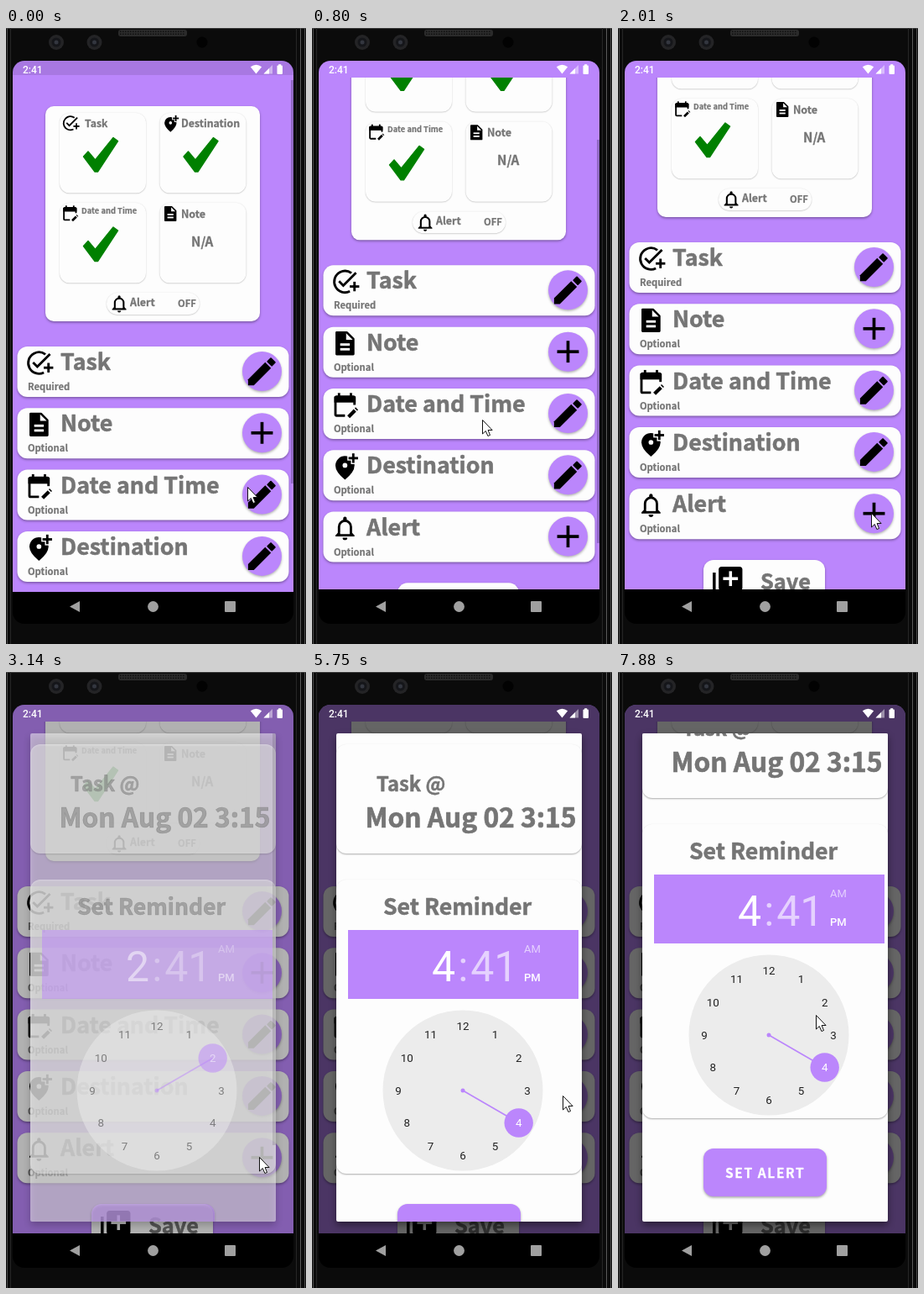
Write an HTML page with a canvas that moves like this. It is 358 px wide and 733 px high and loops after 8 s.

```html
<!DOCTYPE html>
<html lang="en">
<head>
<meta charset="utf-8">
<title>Reminder app</title>
<style>
html, body { margin: 0; width: 100%; height: 100%; overflow: hidden; background: #0b0b0b; }
canvas { display: block; width: 358px; height: 733px; }
</style>
</head>
<body>
<canvas id="stage"></canvas>
<script>
const W = 358, H = 733, LOOP = 8000, TICK = 120;
const canvas = document.getElementById('stage');
const ctx = canvas.getContext('2d');
const dpr = window.devicePixelRatio || 1;
canvas.width = W * dpr;
canvas.height = H * dpr;

const HEAD = '"Noto Sans CJK JP", "Noto Sans CJK SC", "Noto Sans", sans-serif';
const UI = 'Roboto, sans-serif';
const PURPLE = '#bb86fc', PAPER = '#fdfdfd', GREY = '#757575', FAINT = 'rgba(255,255,255,.62)';

// motion
const ramp = (t, from, to) => Math.min(1, Math.max(0, (t - from) / (to - from)));
const easeOut = (p, power) => 1 - (1 - p) ** power;
const smooth = p => p * p * (3 - 2 * p);

const settle = t => 3 * (1 - ramp(t, 0, 390));
const pageScroll = t => 121 * easeOut(ramp(t, 530, 1400), 4);
const pageBar = t => 1 - ramp(t, 1520, 2000);
const sheetScroll = t => 66 * easeOut(ramp(t, 5750, 6250), 2);
const sheetBar = t => 1 - (t < 5750 ? ramp(t, 4280, 4640) : ramp(t, 6740, 6980));

// pointer stops: time of arrival, x, y
const STOPS = [
  [0, 289, 547], [390, 215, 575], [800, 204, 467], [1450, 335, 573], [2000, 303, 578],
  [3650, 303, 578], [4040, 288, 512], [4700, 266, 464], [5000, 267, 477], [5360, 302, 540],
  [5720, 300, 505], [6100, 250, 474], [6490, 206, 602], [6980, 206, 602], [7880, 237, 409]];

function pointerAt(t) {
  const i = STOPS.findLastIndex(s => s[0] <= t);
  const a = STOPS[i], b = STOPS[i + 1] || a;
  const p = a === b ? 0 : smooth(ramp(t, a[0], b[0]));
  return [a[1] + (b[1] - a[1]) * p, a[2] + (b[2] - a[2]) * p];
}

// drawing helpers
function rect(x, y, w, h, color) {
  ctx.fillStyle = color;
  ctx.fillRect(x, y, w, h);
}

function round(x, y, w, h, r, color) {
  ctx.fillStyle = color;
  ctx.beginPath();
  ctx.roundRect(x, y, w, h, r);
  ctx.fill();
}

function disc(x, y, r, color) {
  ctx.fillStyle = color;
  ctx.beginPath();
  ctx.arc(x, y, r, 0, Math.PI * 2);
  ctx.fill();
}

function poly(points, color) {
  ctx.fillStyle = color;
  ctx.beginPath();
  points.forEach(p => ctx.lineTo(...p));
  ctx.closePath();
  ctx.fill();
}

function line(points, width, color = '#000') {
  ctx.strokeStyle = color;
  ctx.lineWidth = width;
  ctx.beginPath();
  points.forEach(p => ctx.lineTo(...p));
  ctx.stroke();
}

function outline(width, color, join = 'round') {
  ctx.strokeStyle = color;
  ctx.lineWidth = width;
  ctx.lineJoin = join;
  ctx.stroke();
}

function plus(x, y, arm, color = '#000') {
  rect(x - arm, y - 1, arm * 2, 2, color);
  rect(x - 1, y - arm, 2, arm * 2, color);
}

function raised(draw, strength = 0.35, blur = 3, dy = 1.5) {
  ctx.save();
  ctx.shadowColor = `rgba(0,0,0,${strength})`;
  ctx.shadowBlur = blur * dpr;
  ctx.shadowOffsetY = dy * dpr;
  draw();
  ctx.restore();
}

function clip(x, y, w, h, r = 0) {
  ctx.beginPath();
  ctx.roundRect(x, y, w, h, r);
  ctx.clip();
}

function text(str, x, y, size, { color = GREY, font = HEAD, weight = 700, align = 'left', gap = 0 } = {}) {
  ctx.font = `${weight} ${size}px ${font}`;
  ctx.fillStyle = color;
  ctx.textAlign = align;
  ctx.letterSpacing = gap + 'px';
  ctx.fillText(str, x, y);
  if (font === HEAD) {   // a little extra weight for headings
    ctx.strokeStyle = color;
    ctx.lineWidth = size * 0.022;
    ctx.lineJoin = 'round';
    ctx.strokeText(str, x, y);
  }
  ctx.letterSpacing = '0px';
}

// icons on a 24-unit grid
const ICONS = {
  task() {
    ctx.beginPath();
    ctx.arc(12, 12, 9, 1.1, 5.36);
    outline(2, '#000', 'miter');
    line([[7, 11.6], [10.6, 15.2], [21.3, 4.5]], 2);
    plus(20, 16, 4);
  },
  note() {
    poly([[5, 3], [13.6, 3], [19, 8.4], [19, 21], [5, 21]], '#000');
    outline(2, '#000');
    poly([[13, 3.5], [18.5, 9], [13, 9]], PAPER);
    for (const y of [12, 16]) rect(8, y, 8, 2, PAPER);
  },
  date() {
    ctx.beginPath();
    ctx.roundRect(4, 5, 16, 16, 1);
    outline(2, '#000');
    rect(3, 5, 18, 5, '#000');
    for (const x of [6, 16]) rect(x, 2, 2, 3, '#000');
    rect(12, 12, 11, 11, PAPER);
    line([[15, 22], [20.4, 16.6]], 3);
    line([[21.2, 15.8], [22, 15]], 3);
  },
  place() {
    ctx.fillStyle = '#000';
    ctx.beginPath();
    ctx.moveTo(12, 23);
    ctx.quadraticCurveTo(4, 16.5, 4, 11.2);
    ctx.arc(12, 11.2, 8, Math.PI, 0);
    ctx.quadraticCurveTo(20, 16.5, 12, 23);
    ctx.fill();
    rect(14, 1, 10, 6, PAPER);
    rect(17, 1, 7, 9, PAPER);
    disc(12, 11, 2, PAPER);
    plus(19, 5, 4);
  },
  bell() {
    ctx.beginPath();
    ctx.moveTo(7, 17);
    ctx.arc(12, 10.8, 5, Math.PI, 0);
    ctx.lineTo(17, 17);
    outline(2, '#000');
    round(10.5, 2.5, 3, 4, 1.5, '#000');
    poly([[6, 16], [18, 16], [20, 18], [20, 19], [4, 19], [4, 18]], '#000');
    rect(8, 15.5, 8, 1.5, PAPER);
    ctx.fillStyle = '#000';
    ctx.beginPath();
    ctx.arc(12, 20, 2, 0, Math.PI);
    ctx.fill();
  },
  save() {
    round(6, 2, 16, 16, 2, '#000');
    plus(14, 10, 5, PAPER);
    ctx.lineJoin = 'round';
    line([[3, 6], [3, 21], [18, 21]], 2);
  },
  edit() {
    poly([[3, 17.25], [14.05, 6.2], [17.8, 9.95], [6.75, 21], [3, 21]], '#000');
    poly([[15.7, 5.7], [17.7, 3.7], [20.3, 6.3], [18.3, 8.3]], '#000');
    outline(1, '#000');
  },
  add() { plus(12, 12, 7); }
};

function icon(name, x, y, scale) {
  ctx.save();
  ctx.translate(x, y);
  ctx.scale(scale, scale);
  ICONS[name]();
  ctx.restore();
}

function drawPhone() {
  rect(0, 0, W, H, '#0b0b0b');
  rect(0, 0, W, 1, '#3a3a3a');
  for (const x of [1, 356]) rect(x, 0, 1, H, '#4a4a4a');
  for (const x of [5, 346]) rect(x, 0, 1, H, '#262626');
  rect(351, 0, 1, H, '#5a5a5a');
  for (const x of [60, 105.5]) {
    disc(x, 17, 9, '#242426');
    disc(x, 17, 5.5, '#15161a');
    disc(x, 17, 2.5, '#33363f');
  }
  disc(234, 17, 6.5, '#020202');
  round(134, 2, 82, 8, 3, '#2b2b2b');
  for (let x = 136; x < 214; x += 3)
    for (let y = 3.5; y < 9; y += 3) rect(x, y, 1.5, 1.5, '#111');
  round(8, 39, 335, 670, 14, '#000');
}

function drawNav() {
  const c = '#a0a0a0';
  poly([[76, 688.5], [88, 682], [88, 695]], c);
  disc(175.5, 688.5, 6.4, c);
  round(261, 682, 13, 13, 1, c);
}

function drawStatus() {
  const c = '#fff';
  text('2:41', 20, 53.5, 12, { color: c, font: UI, weight: 500 });
  ctx.fillStyle = c;
  ctx.beginPath();
  ctx.moveTo(298.5, 54.5);
  ctx.lineTo(291.8, 46.3);
  ctx.quadraticCurveTo(298.5, 41, 305.2, 46.3);
  ctx.fill();
  poly([[318, 44], [318, 54.5], [307.5, 54.5]], 'rgba(255,255,255,.45)');
  poly([[314, 48], [314, 54.5], [307.5, 54.5]], c);
  round(323.5, 44.5, 6.5, 10.5, 1, c);
  rect(325.2, 43.2, 3, 2, c);
}

function drawCheck(x, y) {
  ctx.save();
  ctx.translate(x, y);
  poly([[0.5, 24], [6, 18], [14.5, 28], [36, 1.5], [41.5, 5.5], [17.5, 42], [14, 42]], '#008000');
  outline(1.4, '#008000');
  ctx.restore();
}

function drawSummary() {
  const inset = (...box) => raised(() => round(...box, PAPER), 0.28, 1.5, 0.5);
  raised(() => round(47, 93, 256, 256, 10, PAPER));
  for (const x of [64, 183.5])
    for (const y of [101, 208]) inset(x, y, 103, 95.5, 12);
  inset(120, 315, 111, 26, 13);

  icon('task', 66, 102.5, 0.9);
  text('Task', 94, 117.5, 12.2);
  icon('place', 185.5, 103, 0.9);
  text('Destination', 209, 118, 12.3);
  icon('date', 65.5, 209.5, 0.9);
  text('Date and Time', 90, 221, 9.4);
  icon('note', 185.4, 210.2, 0.9);
  text('Note', 209, 225.5, 12.5);
  drawCheck(92, 129);
  drawCheck(211.5, 129);
  drawCheck(92, 235.5);
  text('N/A', 221, 259.5, 15.2);
  icon('bell', 122.5, 315.5, 1.05);
  text('Alert', 148, 330.5, 12.4);
  text('OFF', 205, 331.5, 11.3);
}

const ROWS = [
  ['Task', 'Required', 'task', 'edit'],
  ['Note', 'Optional', 'note', 'add'],
  ['Date and Time', 'Optional', 'date', 'edit'],
  ['Destination', 'Optional', 'place', 'edit'],
  ['Alert', 'Optional', 'bell', 'add']
];

function drawRow([title, hint, mark, action], i) {
  const y = 379 + i * 73.3;
  raised(() => round(13.5, y, 324, 60, 12, PAPER));
  icon(mark, 22.3, y + 2.5, 1.42);
  text(title, 65, y + 28, 26.8);
  text(hint, 26, y + 52, 11.2);
  raised(() => disc(305.5, y + 29.5, 23.5, PURPLE), 0.3);
  icon(action, 305.5 - 22.2, y + 29.5 - 22.2, 1.85);
}

function drawPage(t) {
  const enter = settle(t), scroll = pageScroll(t);
  ctx.save();
  clip(8, 39, 335, 629 + enter, [14, 14, 0, 0]);
  rect(8, 39, 335, 640, PURPLE);
  rect(8, 39, 335, 17, `rgba(0,0,0,${0.1 * (1 - ramp(t, 0, TICK))})`);
  ctx.save();
  clip(8, 59, 335, 612);
  ctx.translate(0, enter - 3 - scroll);
  drawSummary();
  ROWS.forEach(drawRow);
  raised(() => round(102, 757, 145, 57, 12, PAPER));
  icon('save', 109.5, 761.5, 1.77);
  text('Save', 170, 791.5, 25.4);
  ctx.restore();
  rect(340, 59 + enter + scroll * 0.79, 3, 480, `rgba(0,0,0,${0.22 * pageBar(t)})`);
  ctx.restore();
}

function drawClock(hour) {
  const cx = 180, cy = 498, reach = 77;
  const spot = h => [cx + reach * Math.sin(h * Math.PI / 6), cy - reach * Math.cos(h * Math.PI / 6)];
  disc(cx, cy, 95.5, '#ececec');
  line([[cx, cy], spot(hour)], 1.7, PURPLE);
  disc(cx, cy, 2.5, PURPLE);
  disc(...spot(hour), 17.2, PURPLE);
  for (let h = 1; h <= 12; h++) {
    const [x, y] = spot(h);
    text(String(h), x, y + 4.8, 13.4, {
      color: h === hour ? '#fff' : '#212121', font: UI, weight: 400, align: 'center'
    });
  }
}

function drawSheet(t, open, hour) {
  const scroll = sheetScroll(t);
  const digits = (str, x, color) => text(str, x, 368, 50, { color, font: UI, weight: 400 });

  ctx.save();
  clip(8, 39, 335, 629, [14, 14, 0, 0]);
  rect(8, 39, 335, 629, `rgba(0,0,0,${0.6 * open})`);
  ctx.globalAlpha = open;
  raised(() => round(29, 73, 293, 581, 2, PAPER), 0.45, 9, 4);
  clip(29, 73, 293, 581, 2);

  ctx.save();
  ctx.translate(0, -scroll);
  raised(() => round(29, 86, 293, 130, 12, PAPER), 0.32, 2, 1);
  text('Task @', 77, 142, 23.7);
  text('Mon Aug 02 3:15', 63.5, 185, 31.7);

  raised(() => round(29, 247, 293, 350, 12, PAPER), 0.32, 2, 1);
  text('Set Reminder', 85, 288.5, 26.6);
  rect(43, 307, 275, 82, PURPLE);
  digits(String(hour), 143, '#fff');
  digits(':', 174.3, FAINT);
  digits('41', 189.2, FAINT);
  text('AM', 253, 334, 13, { color: FAINT, font: UI, weight: 400 });
  text('PM', 253, 368, 13, { color: '#fff', font: UI, weight: 500 });
  drawClock(hour);

  raised(() => round(102, 633, 147, 57, 12, PURPLE));
  text('SET ALERT', 128, 668, 15.5, { color: '#fff', gap: 1.6 });
  ctx.restore();

  rect(318, 73 + scroll * 0.843, 4, 490, `rgba(0,0,0,${0.25 * sheetBar(t)})`);
  ctx.restore();
}

function drawPointer(t) {
  const [x, y] = pointerAt(t);
  ctx.save();
  ctx.translate(x - 0.5, y - 0.5);
  poly([[0, 0], [0, 16.5], [3.8, 13], [6.4, 19], [9, 18], [6.6, 12], [11.6, 12]], '#fff');
  outline(1, '#111', 'miter');
  ctx.restore();
}

function frame() {
  const now = performance.now() % LOOP;
  // the screen refreshes in steps; the steps line up with 800 ms
  const t = Math.max(0, 800 + Math.floor((now - 800) / TICK) * TICK);
  const open = now < 3140 ? 0 : now < 3260 ? 0.5 : 1;
  ctx.setTransform(dpr, 0, 0, dpr, 0, 0);
  drawPhone();
  drawPage(t);
  if (open) drawSheet(t, open, now < 5630 ? 2 : 4);
  drawStatus();
  drawNav();
  drawPointer(t);
  requestAnimationFrame(frame);
}
frame();
</script>
</body>
</html>
```
